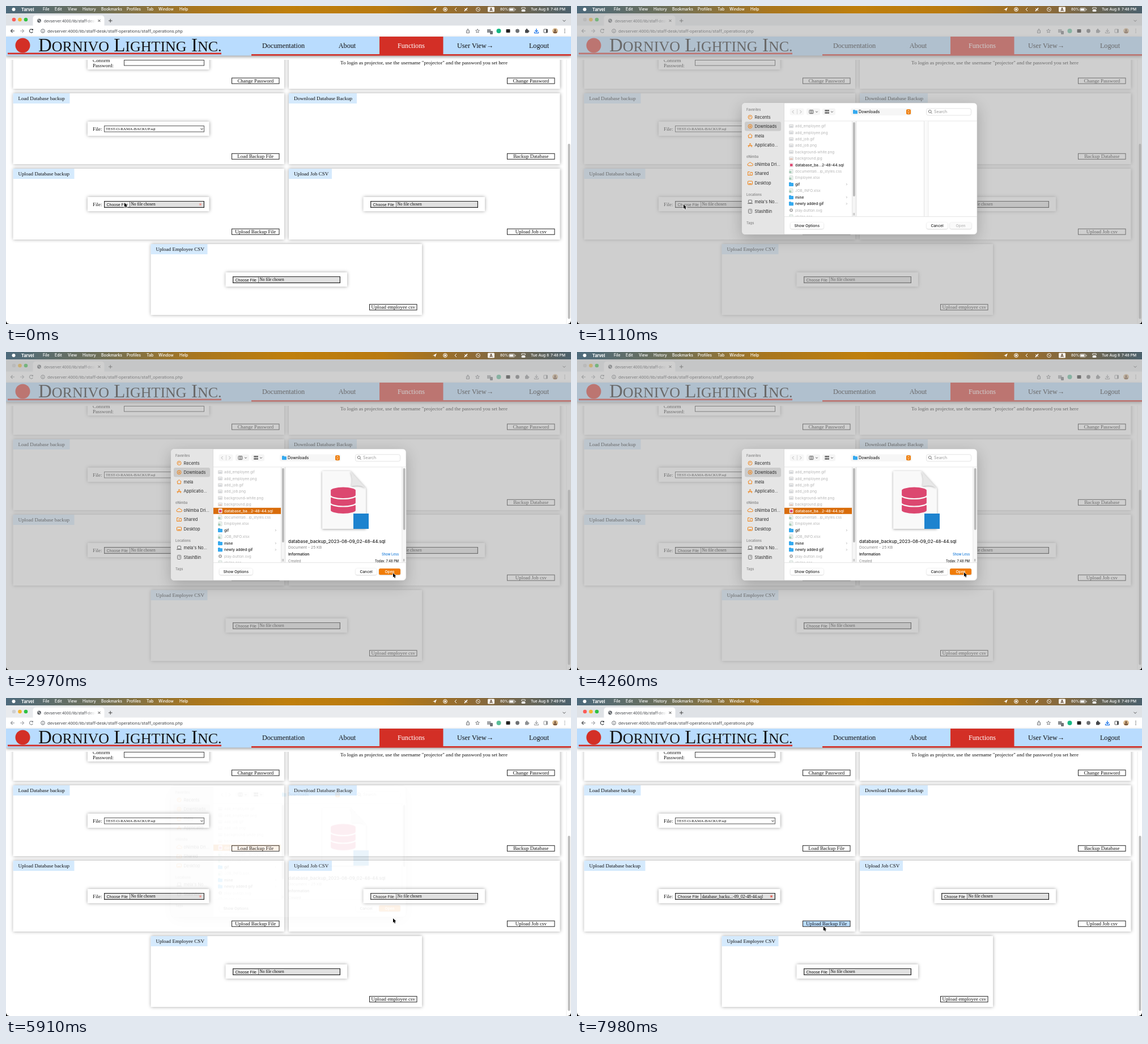
These frames come from a looping animation (997 by 561 pixels, 8 s). An HTML page with a canvas:

```html
<!DOCTYPE html>
<html lang="en">
<head>
<meta charset="utf-8">
<title>Database upload</title>
<style>
html, body { margin: 0; width: 100%; height: 100%; overflow: hidden; background: #000; }
canvas { display: block; }
</style>
</head>
<body>
<canvas id="stage" width="997" height="561"></canvas>
<script>
const W = 997, H = 561, LOOP = 8000;
const SERIF = '"Liberation Serif", serif';
const SANS = 'Inter, sans-serif';
const ARIAL = '"Liberation Sans", sans-serif';
const BLUE = '#b9dcfe', RED = '#d32f26', ORANGE = '#f08010';
const stage = document.getElementById('stage').getContext('2d');
let g = stage;

const clamp = v => Math.max(0, Math.min(1, v));
const ramp = (t, a, b) => clamp((t - a) / (b - a));
const smooth = p => p * p * (3 - 2 * p);

function layer(draw) {
  const c = document.createElement('canvas');
  c.width = W;
  c.height = H;
  const prev = g;
  g = c.getContext('2d');
  draw();
  g = prev;
  return c;
}

// y is the vertical centre of the capitals
function text(s, x, y, size, color = '#111', font = SERIF, align = 'left', weight = 400) {
  g.font = `${weight} ${size}px ${font}`;
  g.textAlign = align;
  g.fillStyle = color;
  g.fillText(s, x, y + size * (font === SERIF ? 0.33 : 0.36));
}
const ui = (s, x, y, size = 7, color = '#222', weight = 400, align = 'left') =>
  text(s, x, y, size, color, SANS, align, weight);

function rect(x, y, w, h, color) {
  g.fillStyle = color;
  g.fillRect(x, y, w, h);
}
function round(x, y, w, h, r, fill, line, lw = 1) {
  g.beginPath();
  g.roundRect(x, y, w, h, r);
  if (fill) { g.fillStyle = fill; g.fill(); }
  if (line) { g.strokeStyle = line; g.lineWidth = lw; g.stroke(); }
}
function dot(x, y, r, fill, line, lw = 1) {
  g.beginPath();
  g.arc(x, y, r, 0, 7);
  if (fill) { g.fillStyle = fill; g.fill(); }
  if (line) { g.strokeStyle = line; g.lineWidth = lw; g.stroke(); }
}
function path(color, lw, ...pts) {
  g.beginPath();
  for (let i = 0; i < pts.length; i += 2) g.lineTo(pts[i], pts[i + 1]);
  g.strokeStyle = color;
  g.lineWidth = lw;
  g.stroke();
}
function shadowed(blur, color, draw, dy = 0) {
  g.save();
  g.shadowBlur = blur;
  g.shadowColor = color;
  g.shadowOffsetY = dy;
  draw();
  g.restore();
}
const chevron = (x, y, s, color, lw = 1) => path(color, lw, x - s, y - s / 2, x, y + s / 2, x + s, y - s / 2);

function menuBar(clock) {
  const grad = g.createLinearGradient(0, 0, W, 0);
  ['#4d6a7c', '#6f7058', '#a8761f', '#bf7f0c', '#b97a10', '#8c6a38', '#4b606c'].forEach((c, i, all) =>
    grad.addColorStop(i / (all.length - 1), c));
  rect(0, 0, W, 13, grad);
  dot(13.5, 6, 3, '#fff');
  ui('Tarvel', 27, 6, 7.4, '#fff', 700);
  const items = { File: 65, Edit: 86, View: 109, History: 135, Bookmarks: 168, Profiles: 213, Tab: 248, Window: 269, Help: 306 };
  for (const name in items) ui(name, items[name], 6, 6.9, '#fff', 500);
  g.fillStyle = '#fff';
  g.beginPath();
  g.moveTo(753, 6.5); g.lineTo(760, 2.5); g.lineTo(757, 9.5); g.lineTo(756.3, 6.5);
  g.fill();
  dot(775, 6, 3.4, null, '#fff');
  rect(773.5, 4.5, 3, 3, '#fff');
  path('#fff', 1, 795, 3, 792, 6, 795, 9);
  path('#fff', 1.8, 809, 9, 814, 3.5);
  path('#fff', 1, 809, 4.5, 814, 8);
  dot(833, 6, 3.5, null, '#fff', 0.8);
  path('#fff', 0.8, 831, 4, 833, 6.5, 835, 6.5);
  round(850, 1.5, 12, 9, 1.5, '#f4f0ea');
  ui('A', 856, 6, 7, '#4a3018', 600, 'center');
  ui('80%', 872, 6, 6.2, '#fff', 500);
  round(887.5, 3.5, 10, 5.5, 1.5, null, '#ddd', 0.8);
  rect(888.5, 4.5, 7, 3.5, '#fff');
  rect(898.5, 5, 1, 2.5, '#ddd');
  round(909.5, 2.5, 7, 3, 1.5, null, '#fff', 0.8);
  round(909.5, 6.7, 7, 3, 1.5, '#fff');
  ui('Tue Aug 8', 926, 6, 6.6, '#fff', 500);
  ui(clock, 987, 6, 6.6, '#fff', 500, 'right');
}

function browserBar(active) {
  const ink = active ? '#44474a' : '#8d9093';
  rect(0, 12, W, 23, active ? '#dfe2e6' : '#e9ebee');
  [[14, active ? '#fc5b57' : '#cfcfd0'], [24.5, '#f5b52e'], [35, '#2fc142']].forEach(([x, c]) => dot(x, 24, 3.3, c));
  round(47.5, 16.5, 126, 22, 5, '#fff');
  dot(58.5, 26, 3.4, '#5f6368');
  path('#fff', 0.8, 56, 24.5, 59, 25, 59, 27, 61, 28);
  const fade = g.createLinearGradient(140, 0, 158, 0);
  fade.addColorStop(0, '#4b4e52');
  fade.addColorStop(1, '#ffffff');
  g.save();
  g.beginPath();
  g.rect(60, 18, 98, 16);
  g.clip();
  text('devserver:4000/lib/staff-desk', 67, 26, 7, fade, 'Roboto, sans-serif');
  g.restore();
  path('#444', 1, 162.5, 24, 166.5, 28);
  path('#444', 1, 166.5, 24, 162.5, 28);
  path('#444', 1, 181, 26, 187.5, 26);
  path('#444', 1, 184.2, 22.8, 184.2, 29.2);
  chevron(985, 26, 2.5, '#555');

  rect(0, 34.5, W, 19, '#fff');
  path(ink, 1.1, 15, 44, 8.5, 44);
  path(ink, 1.1, 11.5, 41, 8.5, 44, 11.5, 47);
  path('#a5a8ab', 1.1, 25, 44, 31.5, 44);
  path('#a5a8ab', 1.1, 28.5, 41, 31.5, 44, 28.5, 47);
  g.beginPath();
  g.arc(44.5, 44, 3, 0.4, 5.6);
  g.strokeStyle = ink;
  g.stroke();
  rect(45.5, 40.5, 2.5, 2.5, ink);
  dot(65, 44, 3.3, null, '#5f6368', 0.9);
  rect(64.6, 43.5, 0.9, 2.7, '#5f6368');
  rect(64.6, 42, 0.9, 0.9, '#5f6368');
  text('devserver:4000/lib/staff-desk/staff-operations/staff_operations.php', 73, 44, 7.9, '#4b4e52', 'Roboto, sans-serif');

  path('#5f6368', 0.9, 813.5, 43, 812.5, 43, 812.5, 47.5, 817.5, 47.5, 817.5, 43, 816.5, 43);
  path('#5f6368', 0.9, 815, 45.5, 815, 40.5);
  path('#5f6368', 0.9, 813.5, 42, 815, 40.5, 816.5, 42);
  g.beginPath();
  for (let i = 0; i < 10; i++) {
    const a = i * Math.PI / 5 - Math.PI / 2, r = i % 2 ? 1.6 : 3.6;
    g.lineTo(832 + r * Math.cos(a), 44.2 + r * Math.sin(a));
  }
  g.closePath();
  g.strokeStyle = '#5f6368';
  g.lineWidth = 0.8;
  g.stroke();
  rect(849, 41, 6.5, 6, active ? '#8b8e92' : '#a5a7aa');
  round(854, 44, 5, 6, 1, '#6f7377');
  dot(869.5, 44, 4, active ? '#16b884' : '#58bd98');
  round(882.5, 41, 7, 6, 1, '#222');
  dot(902.5, 44, 3.4, '#6d7073');
  round(916, 42, 6, 5.5, 1, ink);
  dot(919, 41.5, 1.4, ink);
  dot(922.2, 44.5, 1.3, ink);
  const dl = active ? '#1a73e8' : '#a2a5a8';
  path(dl, 1.3, 936, 40, 936, 45);
  path(dl, 1.3, 933.5, 43, 936, 45.5, 938.5, 43);
  path(dl, 1.2, 932.5, 45.5, 932.5, 47.7, 939.5, 47.7, 939.5, 45.5);
  round(949, 41, 6.5, 6, 0.5, null, ink, 0.9);
  rect(953, 41, 2.5, 6, ink);
  dot(969, 44, 5, '#d8b98d');
  dot(969, 42.7, 1.8, '#715039');
  rect(966, 45, 6, 2.6, '#715039');
  [41, 44, 47].forEach(y => dot(986, y, 0.8, ink));
}

function smallCaps(words, x, y) {
  g.fillStyle = '#151515';
  g.textAlign = 'left';
  for (const word of words.split(' ')) {
    [[word[0], 33], [word.slice(1).toUpperCase(), 26], [' ', 33]].forEach(([s, size]) => {
      g.font = `${size}px ${SERIF}`;
      g.fillText(s, x, y);
      x += g.measureText(s).width;
    });
  }
}

function siteHeader() {
  shadowed(5, 'rgba(0,0,0,.35)', () => rect(0, 54, W, 33.5, BLUE), 2);
  dot(29.5, 69.5, 13, RED);
  rect(3, 82.5, 377, 2.8, RED);
  smallCaps('Dornivo Lighting Inc.', 57, 80);
  rect(433, 85, W - 433, 2.7, RED);
  rect(659, 54, 112.5, 33, RED);
  const nav = { Documentation: 489.5, About: 602, Functions: 715, 'User View→': 828, Logout: 940.5 };
  for (const name in nav) text(name, nav[name], 70, 12.2, name === 'Functions' ? '#fff' : '#111', SERIF, 'center');
}

function panel(x, y, w, h) {
  shadowed(6, 'rgba(0,0,0,.36)', () => rect(x, y, w, h, '#fff'));
}
function card(x, y, title, tabW) {
  panel(x, y, 478.5, 125);
  rect(x, y, tabW, 18, '#d5eafd');
  text(title, x + 9, y + 9.4, 9.05);
}
function button(label, x, y, fill = '#fff') {
  rect(x, y, 84.5, 11, '#222');
  rect(x + 1, y + 1, 82.5, 9, fill);
  text(label, x + 42.3, y + 5.3, 8.95, '#111', SERIF, 'center');
}
function fileInput(x, y, w, name) {
  rect(x, y, w, 12, '#222');
  rect(x + 1, y + 1, w - 2.2, 9.8, '#e1e1e1');
  rect(x + 0.7, y + 0.7, 45, 10.6, '#555');
  rect(x + 1.3, y + 1.3, 43.7, 9.3, '#efefef');
  text('Choose File', x + 4.5, y + 6, 7, '#111', ARIAL);
  text(name || 'No file chosen', x + 47.5, y + 6, name ? 7.7 : 7.4);
}

function page(loaded, hover) {
  rect(0, 53, W, H - 53, '#fff');
  g.save();
  g.beginPath();
  g.rect(0, 95, W, H - 95);
  g.clip();
  panel(12.5, 60, 478.5, 86);
  panel(499, 60, 478.5, 86);
  panel(144, 70, 214.5, 42);
  text('Confirm', 153, 96, 9);
  text('Password:', 153, 105.2, 9);
  g.strokeStyle = '#444';
  g.lineWidth = 1;
  g.strokeRect(208.5, 95.5, 141, 9.5);
  text('To login as projector, use the username "projector" and the password you set here', 737.5, 100.3, 9.05, '#111', SERIF, 'center');
  button('Change Password', 398, 126.5);
  button('Change Password', 884, 126.5);

  card(12.5, 154, 'Load Database backup', 100);
  panel(144, 204, 214.5, 25);
  text('File:', 153, 217, 9);
  g.strokeStyle = '#555';
  g.strokeRect(173.5, 211.5, 176, 10.5);
  text('TEST-O-RAMA-BACKUP.sql', 176, 217, 7.1);
  chevron(345.5, 217, 2, '#111');
  button('Load Backup File', 398, 259.8);
  card(499, 154, 'Download Database Backup', 120);
  button('Backup Database', 884, 259.8);

  card(12.5, 287, 'Upload Database backup', 108);
  panel(144, 337, 214.5, 25);
  text('File:', 153, 350, 9);
  fileInput(173, 344, 177, loaded && 'database_backu...-09_02-48-44.sql');
  for (let i = 0; i < 4; i++) {
    const a = i * Math.PI / 4, dx = 2.3 * Math.cos(a), dy = 2.3 * Math.sin(a);
    path(loaded ? '#e5463c' : '#f08a82', 0.8, 343 - dx, 350 - dy, 343 + dx, 350 + dy);
  }
  button('Upload Backup File', 398, 392.7, hover ? BLUE : '#fff');
  card(499, 287, 'Upload Job CSV', 76);
  panel(630.5, 337, 214.5, 25);
  fileInput(643, 344, 190);
  button('Upload Job csv', 884, 392.7);

  card(255.5, 420, 'Upload Employee CSV', 100);
  panel(387.5, 470, 214.5, 25);
  fileInput(400, 477, 190);
  button('Upload employee csv', 641, 525.8);

  rect(988.5, 95, 1, H, '#ededed');
  round(991.5, 243, 4, 309, 2, '#bdbdbd');
  g.restore();
}

function browser(active, loaded, hover) {
  rect(0, 0, W, H, '#000');
  g.save();
  g.beginPath();
  g.roundRect(0, 12, W, H - 12, [0, 0, 6, 6]);
  g.clip();
  page(loaded, hover);
  browserBar(active);
  siteHeader();
  g.restore();
}

function folder(x, y) {
  round(x - 4, y - 3.5, 4, 3, 0.8, '#2f9fe0');
  round(x - 4, y - 2.5, 8, 6, 0.8, '#35aaf0');
}

function sideIcon(kind, x, y) {
  const line = (...p) => path(ORANGE, 1, ...p);
  if (kind === 'clock') { dot(x, y, 3.4, null, ORANGE); line(x, y - 2, x, y, x - 1.5, y); }
  if (kind === 'down') { dot(x, y, 3.4, null, ORANGE); line(x, y - 2, x, y + 1.5); line(x - 1.5, y, x, y + 1.7, x + 1.5, y); }
  if (kind === 'home') { line(x - 4, y, x, y - 3.5, x + 4, y); line(x - 2.7, y - 0.5, x - 2.7, y + 3.5, x + 2.7, y + 3.5, x + 2.7, y - 0.5); }
  if (kind === 'apps') { line(x, y - 3.5, x - 3, y + 3.5); line(x, y - 3.5, x + 3, y + 3.5); line(x - 4, y + 1, x + 4, y + 1); }
  if (kind === 'cloud') {
    g.beginPath();
    g.arc(x - 2.5, y + 0.8, 2, 1.57, 4.5);
    g.arc(x, y - 0.6, 2.5, 3.5, 6);
    g.arc(x + 3, y + 0.8, 2, 4.7, 1.57);
    g.closePath();
    g.strokeStyle = ORANGE;
    g.stroke();
  }
  if (kind === 'shared') {
    line(x - 3.8, y + 3, x - 3.8, y - 3, x - 1, y - 3, x, y - 2, x + 3.8, y - 2, x + 3.8, y + 3, x - 4.2, y + 3);
    dot(x, y + 0.7, 1, ORANGE);
  }
  if (kind === 'desk') { round(x - 4, y - 3, 8, 6, 1, null, ORANGE); rect(x - 2.5, y + 1, 5, 1, ORANGE); }
  if (kind === 'laptop') { round(x - 3, y - 3, 6, 5, 0.7, null, '#666', 0.9); path('#666', 1, x - 4.5, y + 3, x + 4.5, y + 3); }
  if (kind === 'drive') { round(x - 3, y - 3.5, 6, 7, 1, null, '#666', 0.9); ui('?', x, y, 5, '#666', 600, 'center'); }
}

const SIDE = [
  ['', 'Favorites', 183], ['clock', 'Recents', 196], ['down', 'Downloads', 212.3], ['home', 'mela', 229],
  ['apps', 'Applicatio...', 245.5], ['', 'oNimba', 266], ['cloud', 'oNimba Dri...', 279], ['shared', 'Shared', 295.5],
  ['desk', 'Desktop', 312], ['', 'Locations', 332.5], ['laptop', "mela's No...", 345.3], ['drive', 'StashBin', 362],
  ['', 'Tags', 382.5]
];
const FILES = ['add_employee.gif', 'add_employee.png', 'add_job.gif', 'add_job.png', 'background-white.png', 'background.jpg',
  'database_ba...2-48-44.sql', 'documentati...ip_styles.css', 'Employee.xlsx', '/gif', 'JOB_INFO.xlsx', '/mine',
  '/newly added gif', 'play-button.svg', 'styles.css'];

function fileList(selected) {
  FILES.forEach((file, i) => {
    const y = 211.8 + i * 11.42, isDb = i === 6;
    if (isDb && selected) rect(366, y - 5.5, 119, 11, '#d96c0a');
    if (file[0] === '/') {
      folder(378, y);
      ui(file.slice(1), 385, y, 6.6, '#222', 500);
      path('#aaa', 0.8, 475, y - 1.6, 476.6, y, 475, y + 1.6);
      return;
    }
    if (isDb) {
      round(375, y - 4, 6.5, 8, 0.8, '#fff', '#ccc', 0.5);
      rect(376, y - 2, 4.5, 4.5, '#dc4770');
    } else if (/xlsx|css/.test(file)) {
      round(375, y - 3.5, 6, 7, 0.6, '#eef3f0', '#c3d0ca', 0.7);
      rect(374.3, y - 0.5, 4, 3.5, '#a5cbb6');
    } else if (/svg/.test(file)) {
      dot(378, y, 3, '#aaa');
      rect(377, y - 1, 2, 2, '#fff');
    } else {
      round(374.5, y - 2.7, 7, 5.5, 0.5, '#eee', '#ccc', 0.7);
      rect(375.5, y, 5, 1.8, /jpg/.test(file) ? '#e2b7a4' : '#c9cdd2');
    }
    ui(file, 385, y, isDb ? 6.7 : 6.45, isDb ? (selected ? '#fff' : '#222') : '#b4b4b4', isDb ? 500 : 400);
  });
}

function preview() {
  g.beginPath();
  g.moveTo(558, 210); g.lineTo(608, 210); g.lineTo(635, 240); g.lineTo(635, 312); g.lineTo(558, 312);
  g.closePath();
  g.fillStyle = '#f9f9f9';
  shadowed(4, 'rgba(0,0,0,.35)', () => g.fill(), 1);
  g.beginPath();
  g.moveTo(607, 210); g.quadraticCurveTo(613, 224, 609, 237); g.quadraticCurveTo(626, 233, 635, 241);
  g.closePath();
  g.fillStyle = '#e7e7e7';
  shadowed(3, 'rgba(0,0,0,.3)', () => g.fill(), 1);

  // stacked discs, bottom first, parted by a pale gap
  for (let i = 2; i >= 0; i--) {
    const y = 244 + i * 13.5;
    g.beginPath();
    g.ellipse(595, y + 8.5, 23, 6.5, 0, 0, Math.PI);
    g.ellipse(595, y, 23, 6.5, 0, Math.PI, 0);
    g.closePath();
    g.fillStyle = '#dc4770';
    g.fill();
    g.strokeStyle = '#f9f9f9';
    g.lineWidth = 2.2;
    g.stroke();
  }
  rect(613, 285, 27, 27, '#1d83cf');

  ui('database_backup_2023-08-09_02-48-44.sql', 498, 334, 7.9, '#222', 500);
  ui('Document - 25 KB', 498, 345, 6.8, '#858585');
  ui('Information', 498, 357, 6.7, '#222', 600);
  ui('Show Less', 693, 357.3, 5.8, '#1679d8', 500, 'right');
  ui('Created', 498, 369, 6, '#858585');
  ui('Today, 7:48 PM', 693, 369, 5.7, '#222', 500, 'right');
}

function pill(label, x, w, fill, color) {
  shadowed(2, 'rgba(0,0,0,.25)', () => round(x, 382, w, 11, 2.5, fill), 0.5);
  ui(label, x + w / 2, 387.3, 6.7, color, 500, 'center');
}

function dialog(selected) {
  shadowed(26, 'rgba(0,0,0,.22)', () => round(291, 171, 415, 232, 6, '#fff'), 7);
  round(291, 171, 415, 232, 6, '#fff', '#c4c4c4', 0.6);
  round(291, 171, 74, 232, [6, 0, 0, 6], '#e5e5e5');
  rect(365, 171, 0.8, 232, '#d2d2d2');
  round(296, 204, 64, 16.5, 3, '#cbcbcb');
  for (const [icon, label, y] of SIDE) {
    if (!icon) { ui(label, 299, y, 5.7, '#8a8a8a', 600); continue; }
    sideIcon(icon, 305.5, y);
    ui(label, 313.5, y, 7.4, '#2b2b2b');
  }

  round(375.5, 180.5, 25, 12, 3, '#f7f7f7');
  path('#b5b5b5', 1, 382.5, 184, 380, 186.7, 382.5, 189.4);
  path('#b5b5b5', 1, 393.5, 184, 396, 186.7, 393.5, 189.4);
  rect(388, 182, 0.7, 9, '#ccc');
  round(405, 180.5, 24, 12, 3, '#f5f5f5');
  round(410, 183.7, 7, 6, 0.8, null, '#555', 0.9);
  rect(412, 184, 0.8, 6, '#555');
  rect(414.3, 184, 0.8, 6, '#555');
  chevron(423, 186.7, 1.8, '#555');
  round(433, 180.5, 23, 12, 3, '#f5f5f5');
  for (let i = 0; i < 6; i++) rect(437.5 + i % 3 * 2.6, 183.2 + (i > 2 ? 4 : 0), 2, 2.6, '#444');
  chevron(450, 186.7, 1.8, '#555');
  round(483, 180.5, 108, 12.5, 3, '#f6f6f6');
  folder(491, 186.7);
  ui('Downloads', 497, 186.6, 7, '#222', 500);
  round(581, 182.2, 8, 9, 2, '#ee7d0c');
  path('#fff', 0.9, 583.4, 185.9, 585, 184.2, 586.6, 185.9);
  path('#fff', 0.9, 583.4, 187.6, 585, 189.3, 586.6, 187.6);
  round(616.5, 180.8, 79, 12, 3, '#fff', '#dedede', 0.8);
  dot(622.8, 186, 2.4, null, '#666', 0.9);
  path('#666', 0.9, 624.5, 187.8, 626.5, 190);
  ui('Search', 630, 186.8, 7, '#999');

  rect(366, 202.5, 340, 0.8, '#e2e2e2');
  g.save();
  g.beginPath();
  g.rect(366, 203, 340, 168.3);
  g.clip();
  fileList(selected);
  rect(485, 203, 8, 169, '#f5f5f5');
  rect(485, 203, 0.7, 169, '#ddd');
  rect(492.3, 203, 0.8, 169, '#d5d5d5');
  round(487, 205, 3.8, 131, 1.9, '#b9b9b9');
  const grips = x => { rect(x, 365, 0.7, 4.5, '#999'); rect(x + 1.6, 365, 0.7, 4.5, '#999'); };
  grips(487.5);
  if (selected) {
    preview();
    rect(698.5, 203, 7.5, 169, '#f7f7f7');
    rect(698.5, 203, 0.7, 169, '#e2e2e2');
    round(700.8, 205, 3.8, 109, 1.9, '#b9b9b9');
    grips(701);
  } else {
    rect(612, 203, 8, 169, '#fafafa');
    rect(612, 203, 0.8, 169, '#dcdcdc');
    rect(619.5, 203, 0.8, 169, '#e6e6e6');
  }
  g.restore();
  rect(366, 371.3, 340, 0.8, '#dfdfdf');
  pill('Show Options', 376.5, 58.5, '#fff', '#222');
  pill('Cancel', 617, 37, '#fff', '#222');
  if (selected) pill('Open', 658, 38, '#f07c08', '#fff');
  else pill('Open', 658, 38, '#fafafa', '#b8b8b8');
}

// time, x, y of the pointer tip
const MOVES = [
  [0, 209, 347], [250, 209, 347], [900, 188, 350], [1200, 188, 350], [1850, 432, 280],
  [2150, 432, 280], [2800, 683, 390], [3000, 683, 390], [3300, 683, 388.7],
  [7200, 683, 388.7], [7900, 434.8, 402.8], [8000, 434.8, 402.8]
];
function pointer(t) {
  const i = MOVES.findIndex(m => m[0] > t);
  const [t0, x0, y0] = MOVES[i - 1], [t1, x1, y1] = MOVES[i];
  const p = smooth(ramp(t, t0, t1));
  return [x0 + (x1 - x0) * p, y0 + (y1 - y0) * p];
}
function drawPointer(x, y) {
  g.save();
  g.translate(x, y);
  g.beginPath();
  [[0, 0], [0, 7.6], [1.7, 6.1], [2.8, 8.8], [4.2, 8.2], [3.1, 5.6], [5.4, 5.4]].forEach(p => g.lineTo(...p));
  g.closePath();
  g.lineWidth = 1.3;
  g.strokeStyle = '#fff';
  g.stroke();
  g.fillStyle = '#000';
  g.fill();
  g.restore();
}

const cache = {};
function cached(name, draw, ...args) {
  const key = name + args;
  return cache[key] || (cache[key] = layer(() => draw(...args)));
}

function render(t) {
  const [x, y] = pointer(t);
  const hover = x > 398 && x < 482.5 && y > 392 && y < 404;
  const active = t < 600 || t >= 6300;
  g.drawImage(cached('browser', browser, active, t >= 6300, hover), 0, 0);

  const dim = Math.min(ramp(t, 600, 820), 1 - ramp(t, 5700, 5880));
  if (dim > 0) {
    g.globalAlpha = dim;
    round(0, 12, W, H - 12, [0, 0, 6, 6], 'rgba(171,171,171,.57)');
  }
  const shown = Math.min(ramp(t, 600, 850), 1 - ramp(t, 5700, 5932));
  if (shown > 0) {
    g.globalAlpha = shown;
    g.drawImage(cached('dialog', dialog, t >= 1980), 0, -18 * (1 - shown));
  }
  g.globalAlpha = 1;
  menuBar(t < 4740 ? '7:48 PM' : '7:49 PM');
  drawPointer(x, y);
}

function tick() {
  render(performance.now() % LOOP);
  requestAnimationFrame(tick);
}
tick();
</script>
</body>
</html>
```
